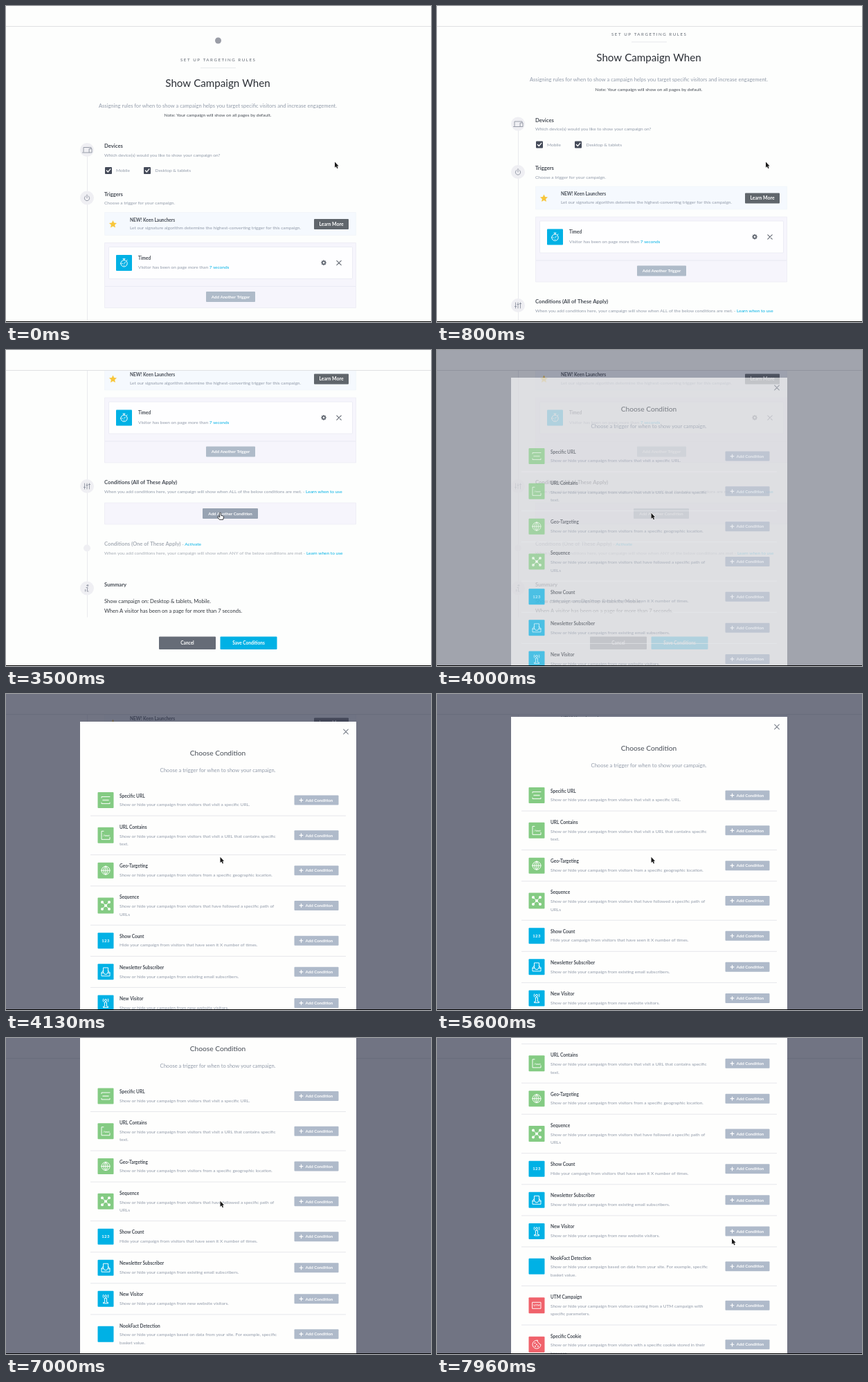
These frames come from a looping animation (614x457 px, 8 s). An HTML page with a canvas:

```html
<!DOCTYPE html>
<html lang="en">
<head>
<meta charset="utf-8">
<title>Targeting rules</title>
<style>
  html, body { margin: 0; width: 100%; height: 100%; overflow: hidden; background: #fdfefd; }
  canvas { display: block; width: 614px; height: 457px; }
</style>
</head>
<body>
<canvas id="stage" width="614" height="457"></canvas>
<script>
const ctx = document.getElementById('stage').getContext('2d');
const LOOP = 8000;
const BG = '#fdfefd', DARK = '#454b54', INK = '#33383f', GREY = '#929baa', PALE = '#a7adb6';
const BLUE = '#00b1e5', GREEN = '#84cb83', RED = '#f0626b', SLATE = '#646a74', WHITE = '#fff';
const XS = 6.15, S = 6.53, M = 7.56, HEAD = 7.68;

// Scroll positions as [time, offset]
const PAGE_SCROLL = [[0, 0], [560, 4], [660, 15], [800, 37.5], [900, 62], [1000, 82], [1060, 94], [1130, 100],
  [1560, 102], [1700, 116], [1800, 148], [1900, 187.5], [2030, 232], [2130, 260], [2230, 273.5]];
const MODAL_SCROLL = [[0, 0], [5500, 3], [5600, 7], [5800, 12], [5870, 20], [5940, 30], [6020, 41], [6090, 50],
  [6160, 55], [6230, 58], [6700, 61], [6780, 65], [6860, 69]];

const clamp = v => Math.max(0, Math.min(1, v));
const mix = (a, b, p) => a + (b - a) * p;
const span = (t, a, b) => clamp((t - a) / (b - a));
const ease = p => p * p * (3 - 2 * p);

function held(keys, t) {
  let value = keys[0][1];
  for (const [at, v] of keys) if (t >= at) value = v;
  return value;
}

function box(x, y, w, h, fill, r = 0, edge) {
  ctx.beginPath();
  ctx.roundRect(x, y, w, h, r);
  ctx.fillStyle = fill;
  ctx.fill();
  if (edge) {
    ctx.strokeStyle = edge;
    ctx.lineWidth = 0.6;
    ctx.stroke();
  }
}

function disc(x, y, r, fill) {
  ctx.beginPath();
  ctx.arc(x, y, r, 0, Math.PI * 2);
  ctx.fillStyle = fill;
  ctx.fill();
}

function line(x, y, w, fill) {
  ctx.fillStyle = fill;
  ctx.fillRect(x, y - 0.5, w, 1);
}

// Places text by the middle of its capitals and returns its right end
function text(str, x, y, size, fill, { bold, align = 'left', gap = 0 } = {}) {
  ctx.font = `${bold ? 700 : 400} ${size}px Lato, sans-serif`;
  ctx.letterSpacing = gap + 'px';
  ctx.textAlign = align;
  ctx.fillStyle = fill;
  ctx.fillText(str, x, y + size * 0.35);
  return x + ctx.measureText(str).width;
}

const bold = (str, x, y, size, fill) => text(str, x, y, size, fill, { bold: true });
const centered = (str, y, size, fill) => text(str, 306, y, size, fill, { align: 'center' });

function button(str, x, y, w, h, fill, size) {
  box(x, y, w, h, fill, 1);
  text(str, x + w / 2, y + h / 2, size, WHITE, { bold: true, align: 'center' });
}

function draw(path, x, y, color, width = 1, fill) {
  const p = new Path2D(path);
  ctx.save();
  ctx.translate(x, y);
  if (fill) {
    ctx.fillStyle = fill;
    ctx.fill(p);
  }
  if (color) {
    ctx.strokeStyle = color;
    ctx.lineWidth = width;
    ctx.lineJoin = ctx.lineCap = 'round';
    ctx.stroke(p);
  }
  ctx.restore();
}

const circle = (r, x = 0, y = 0) => `M${x - r} ${y}a${r} ${r} 0 1 0 ${2 * r} 0a${r} ${r} 0 1 0 ${-2 * r} 0z`;

function star(x, y, r) {
  ctx.beginPath();
  for (let i = 0; i < 10; i++) {
    const a = i * Math.PI / 5 - Math.PI / 2, d = i % 2 ? r * 0.48 : r;
    ctx.lineTo(x + d * Math.cos(a), y + d * Math.sin(a));
  }
  ctx.closePath();
  ctx.fillStyle = '#f8c63a';
  ctx.fill();
}

function gear(x, y) {
  ctx.strokeStyle = SLATE;
  ctx.lineWidth = 1.6;
  ctx.beginPath();
  for (let i = 0; i < 8; i++) {
    const c = Math.cos(i * Math.PI / 4), s = Math.sin(i * Math.PI / 4);
    ctx.moveTo(x + 2 * c, y + 2 * s);
    ctx.lineTo(x + 3.7 * c, y + 3.7 * s);
  }
  ctx.stroke();
  draw(circle(2.1), x, y, SLATE, 1.6);
}

const cross = (x, y, r, color) => draw(`M${-r} ${-r}L${r} ${r}M${r} ${-r}L${-r} ${r}`, x, y, color, 1.1);

function check(x, y) {
  box(x - 5, y - 5, 10, 10, '#454b59', 1);
  draw('M-2.6 0L-.7 2L2.8 -2.2', x, y, WHITE, 1.3);
}

function steps() {
  ctx.fillStyle = '#e9eaee';
  ctx.fillRect(117, 208, 1, 452);
  const tint = '#8d92a0';
  for (const y of [208, 277.5, 470.5, 618]) disc(117, y, 10, '#efeff3');
  disc(117, 560, 5, '#efeff3');
  draw('M-5 3V-3.5H6V-2M-6.5 4H3M3.5 -1.5H7V4H3.5z', 117, 208, tint, 0.9);
  draw('M-2 -2.7A3.7 3.7 0 1 0 2 -2.7M0 -4.6V0', 117, 277.5, tint, 0.9);
  draw('M-3.5 -4V4M0 -4V4M3.5 -4V4M-4.7 1.5H-2.3M-1.2 -1.5H1.2M2.3 -2.5H4.7', 117, 470.5, tint, 0.9);
  draw(circle(1, 1, -4) + 'M-1 -1H1L0 4.5H2M-2.5 2V4.5', 117, 618, tint, 0.9);
}

function intro() {
  disc(306.5, 50, 4.5, '#9a9da6');
  text('SET UP TARGETING RULES', 252, 78, XS, '#5f6670', { gap: 1.54 });
  line(281, 89.5, 51, '#e8eaec');
  centered('Show Campaign When', 112, 15.16, '#2b2f36');
  centered('Assigning rules for when to show a campaign helps you target specific visitors and increase engagement.', 144, M, GREY);
  centered('Note: Your campaign will show on all pages by default.', 158, S, DARK);
}

function devices() {
  bold('Devices', 142, 202.5, HEAD, DARK);
  text('Which device(s) would you like to show your campaign on?', 142, 215.5, S, GREY);
  check(148, 238);
  text('Mobile', 159, 238, S, GREY);
  check(204, 238);
  text('Desktop & tablets', 215.5, 238, S, GREY);
}

function triggers() {
  bold('Triggers', 142, 272, HEAD, DARK);
  text('Choose a trigger for your campaign.', 142, 285, S, GREY);

  box(142.5, 298.5, 363, 33, '#f5f9fe', 0, '#eff4f9');
  star(154.5, 315.7, 5.8);
  bold('NEW! Keen Launchers', 179, 309.5, S, DARK);
  text('Let our signature algorithm determine the highest-converting trigger for this campaign.', 179, 321, S, GREY);
  button('Learn More', 445, 308, 50, 15, '#60666c', 6.9);

  box(142.5, 342.5, 363, 94, '#f6f5fc', 0, '#e8e8f2');
  line(143, 405.5, 362, '#eaeaf4');
  box(148.5, 348.5, 352, 46, '#fefeff', 1, '#e2e4ee');
  box(159, 360, 23, 23, BLUE, 1);
  draw(circle(4.7, 0, 0.8) + 'M0 -4V-5.6M-1.5 -5.8H1.5M3.6 -3L4.6 -4M0 1L2 -1M-2.5 1H-2M0 3.6V3.4', 170.5, 371.5, WHITE, 1);
  bold('Timed', 191, 364.5, S, DARK);
  const end = text('Visitor has been on page more than ', 191, 378, S, GREY);
  text('7 seconds', end, 378, S, BLUE);
  gear(459, 371.3);
  cross(481, 371.5, 3.2, SLATE);
  button('Add Another Trigger', 289, 413, 71, 15, '#afbbc9', XS);
}

function conditions(hover) {
  bold('Conditions (All of These Apply)', 142, 464.5, HEAD, DARK);
  let end = text('When you add conditions here, your campaign will show when ALL of the below conditions are met. - ', 142, 478.2, S, GREY);
  text('Learn when to use', end, 478.2, S, BLUE);
  box(142.5, 494.5, 363, 31, '#f6f5fc', 0, '#e8e8f2');
  const shade = [mix(175, 152, hover), mix(187, 163, hover), mix(201, 178, hover)].map(Math.round);
  button('Add Another Condition', 284, 502.5, 80, 15, `rgb(${shade})`, XS);

  end = bold('Conditions (One of These Apply)', 142, 554, HEAD, PALE);
  end = text(' - ', end, 554, S, GREY);
  text('Activate', end, 554, S, BLUE);
  end = text('When you add conditions here, your campaign will show when ANY of the below conditions are met - ', 142, 567.7, S, PALE);
  text('Learn when to use', end, 567.7, S, BLUE);
}

function summary() {
  bold('Summary', 142, 612.5, HEAD, DARK);
  text('Show campaign on: Desktop & tablets, Mobile.', 142, 637, M, INK);
  text('When A visitor has been on a page for more than 7 seconds.', 142, 650.5, M, INK);
  button('Cancel', 221, 688, 82, 18.5, '#666c77', S);
  button('Save Conditions', 309.5, 688, 82, 18.5, BLUE, S);
}

function page(scroll, hover) {
  ctx.save();
  ctx.translate(0, -scroll);
  steps();
  intro();
  devices();
  triggers();
  conditions(hover);
  summary();
  ctx.restore();
  box(0, 0, 614, 29, BG);
  line(0, 29.5, 614, '#dfe1e3');
}

const FRAME = 'M6 3V6H-6V-6H-3';
const label = (str, size) => (x, y) => text(str, x, y, size, WHITE, { bold: true, align: 'center', gap: 0.4 });
const outline = path => (x, y) => draw(path, x, y, WHITE, 0.95);

const ICONS = {
  url(x, y) {
    outline('M-6 3.5V5H6V3.5M-6 -3.5V-5H6')(x, y);
    draw('M-4 0H4', x, y, '#dff2de', 1.6);
  },
  part(x, y) {
    outline(FRAME)(x, y);
    text('/text', x + 1, y + 0.3, 4.3, WHITE, { bold: true, align: 'center' });
  },
  globe: outline(circle(6) + 'M-6 0H6M0 -6V6M0 -6C-4 -3 -4 3 0 6C4 3 4 -3 0 -6'),
  path(x, y) {
    outline('M-5 -5L5 5M5 -5L-5 5')(x, y);
    for (const [dx, dy] of [[-5, -5], [5, -5], [0, 0], [-5, 5], [5, 5]]) disc(x + dx, y + dy, 2, WHITE);
  },
  count: label('123', 6),
  mail: outline('M-3.5 1V-6H3.5V1M-3.5 -2L-6 1V6H6V1L3.5 -2M-6 1.5H-2.5L-1.5 3.5H1.5L2.5 1.5H6'),
  visitor: outline(circle(1.6, 0, -4) + 'M-1.5 -1H1.5V5H3.5V6.5H-3.5V5H-1.5zM-3.5 -2A5 5 0 0 1 -3.5 -6M3.5 -2A5 5 0 0 0 3.5 -6'),
  plain() {},
  utm(x, y) {
    outline('M-6 -4.5H6V4.5H-6z')(x, y);
    text('UTM', x, y, 4.2, WHITE, { bold: true, align: 'center' });
  },
  cookie(x, y) {
    outline('M1 -6A6 6 0 1 0 6 0A3 3 0 0 1 3 -2.5A3 3 0 0 1 1 -6z')(x, y);
    for (const [dx, dy] of [[-2.5, -2], [-2, 2.5], [2, 2.5], [0, 0]]) disc(x + dx, y + dy, 0.9, WHITE);
  }
};

const ROWS = [
  [GREEN, 'url', 'Specific URL', 'Show or hide your campaign from visitors that visit a specific URL.'],
  [GREEN, 'part', 'URL Contains', 'Show or hide your campaign from visitors that visit a URL that contains specific', 'text.'],
  [GREEN, 'globe', 'Geo-Targeting', 'Show or hide your campaign from visitors from a specific geographic location.'],
  [GREEN, 'path', 'Sequence', 'Show or hide your campaign from visitors that have followed a specific path of', 'URLs'],
  [BLUE, 'count', 'Show Count', 'Hide your campaign from visitors that have seen it X number of times.'],
  [BLUE, 'mail', 'Newsletter Subscriber', 'Show or hide your campaign from existing email subscribers.'],
  [BLUE, 'visitor', 'New Visitor', 'Show or hide your campaign from new website visitors.'],
  [BLUE, 'plain', 'NookFact Detection', 'Show or hide your campaign based on data from your site. For example, specific', 'basket value.'],
  [RED, 'utm', 'UTM Campaign', 'Show or hide your campaign from visitors coming from a UTM campaign with', 'specific parameters.'],
  [RED, 'cookie', 'Specific Cookie', 'Show or hide your campaign from visitors with a specific cookie stored in their', 'browser.']
];

function row([color, icon, title, first, second], y) {
  const top = y - (second ? 11.8 : 6.3);
  box(132.5, y - 11.5, 23, 23, color, 1);
  ICONS[icon](144, y);
  bold(title, 164, top, S, DARK);
  text(first, 164, top + 12.7, S, GREY);
  if (second) text(second, 164, top + 24.2, S, GREY);
  box(416.5, y - 7, 64, 14, '#afbaca', 1);
  draw('M-2.4 0H2.4M0 -2.4V2.4', 426.5, y, WHITE, 1.2);
  bold('Add Condition', 432.5, y, XS, WHITE);
}

function modal(scroll) {
  ctx.save();
  ctx.translate(0, -scroll);
  box(107, 40, 399, 700, '#fefefd');
  cross(491, 54.5, 3.3, '#7c828c');
  centered('Choose Condition', 85, 10.2, DARK);
  centered('Choose a trigger for when to show your campaign.', 110, M, GREY);
  let y = 131;
  for (const item of ROWS) {
    const h = item.length > 4 ? 56.5 : 45.1;
    row(item, y + h / 2);
    y += h;
    line(122, y, 369, '#e6e7eb');
  }
  ctx.restore();
}

const ARROW = 'M0 0V8.2L1.9 6.5L3.2 9.5L4.6 8.9L3.3 6H5.6z';
const HAND = 'M-1 0Q0 -1.2 1 0V3.4L4 4.2Q5.2 4.6 5 6L4.2 9.5H-1.2L-4 5.6Q-3.6 4.2 -2.4 5L-1 6z';

function cursor(x, y, hand) {
  if (hand) {
    draw(HAND, x, y, '#22252b', 0.9, WHITE);
  } else {
    draw(ARROW, x, y, WHITE, 0.9);
    draw(ARROW, x, y, null, 0, '#1a1a1a');
  }
}

function pointer(t) {
  if (t < 7400) {
    const p = ease(span(t, 2600, 3060));
    return [mix(475, 309.5, p), mix(225.5, 235.8, p)];
  }
  const a = ease(span(t, 7400, 7800)), b = ease(span(t, 7800, 7960));
  return [mix(309.5, 348, a) + 78 * b, mix(235.8, 287, a) + 3 * b];
}

function render(t) {
  ctx.fillStyle = BG;
  ctx.fillRect(0, 0, 614, 457);
  page(held(PAGE_SCROLL, t), span(t, 3230, 3500));

  const shown = ease(span(t, 3800, 4130));
  if (shown > 0) {
    ctx.globalAlpha = shown;
    box(0, 0, 614, 457, 'rgba(55, 59, 81, 0.7)');
    modal(held(MODAL_SCROLL, t) + 98.5 * ease(span(t, 6970, 7650)));
    ctx.globalAlpha = 1;
  }

  const [x, y] = pointer(t);
  cursor(x, y, x < 364 && t < 3960);
  ctx.fillStyle = '#000';
  ctx.fillRect(0, 456, 614, 1);
}

const start = performance.now();
function tick() {
  render((performance.now() - start) % LOOP);
  requestAnimationFrame(tick);
}
tick();
</script>
</body>
</html>
```
